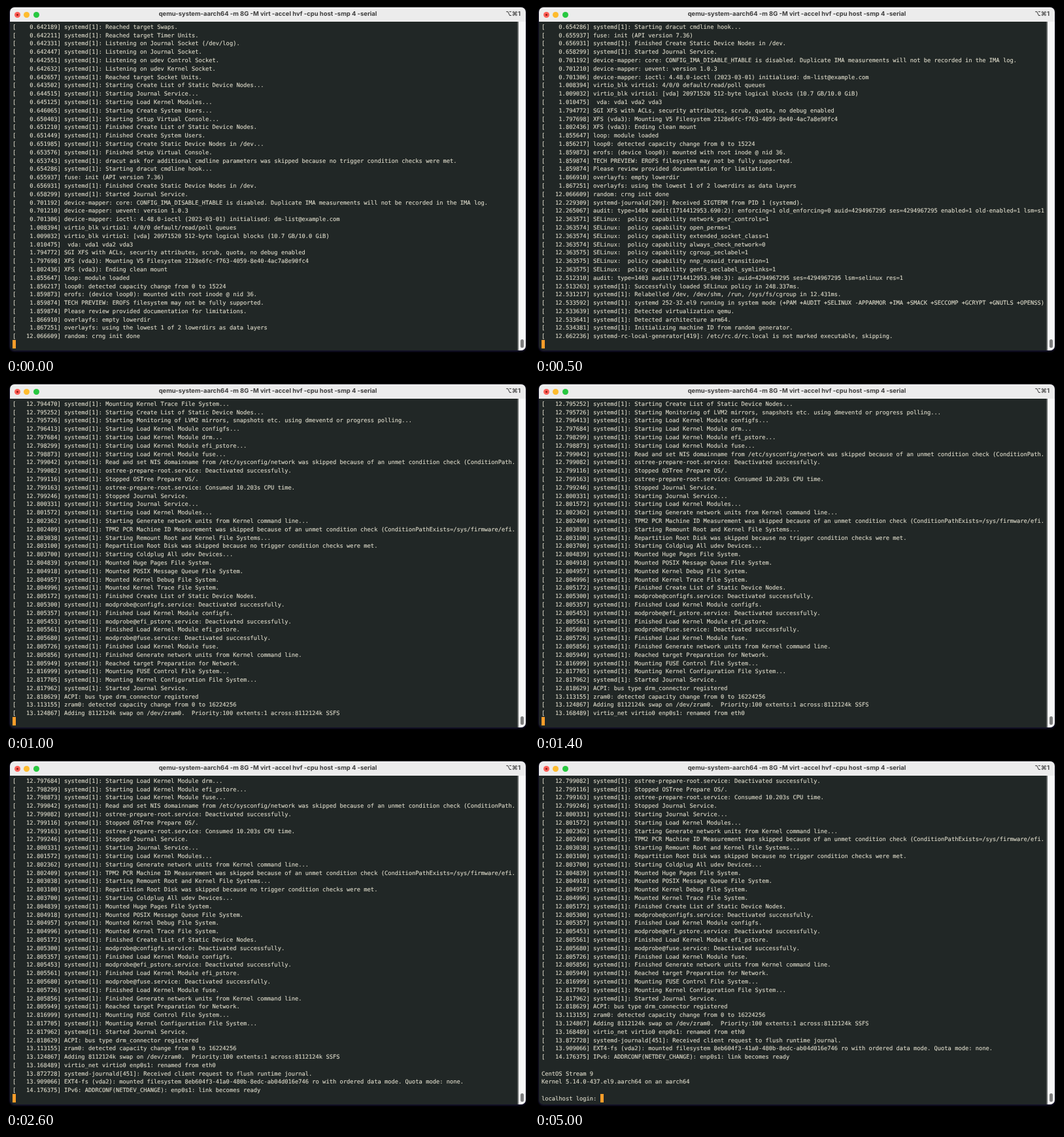
An HTML page that plays this animation: 800x534 px, repeating every 6 s.

```html
<!DOCTYPE html>
<html lang="en">
<head>
<meta charset="utf-8">
<title>Boot console</title>
<style>
  html, body { margin: 0; width: 100%; height: 100%; overflow: hidden; background: #000; }
  body { position: relative; text-rendering: geometricPrecision; }
  #window { position: absolute; left: 6px; top: 2px; width: 789px; height: 525px;
    border-radius: 7px; overflow: hidden; background: #212726; box-shadow: 0 1px 2px 1px #14112a; }
  #window * { position: absolute; margin: 0; white-space: pre; }
  #bar { left: 0; top: 0; width: 100%; height: 21.5px; background: #ececec;
    font: 700 9.45px/21.5px Inter, sans-serif; color: #3c3c3c; }
  #name { left: 0; top: 0; width: 100%; text-align: center; }
  #keys { right: 8px; top: 0; color: #4a4a4a; }
  .light { top: 6.5px; width: 9px; height: 9px; border-radius: 50%; }
  #dot { left: 3px; top: 3px; width: 3px; height: 3px; border-radius: 50%; background: #8c1a10; }
  #track { right: 0; top: 21.5px; width: 11px; bottom: 0; background: #f8f8f8; border-left: 2px solid #5d6160; }
  #thumb { left: 2.5px; bottom: 4px; width: 5.5px; height: 13px; border-radius: 3px; background: #7d7d7d; }
  #log { left: 4px; top: 24.8px; color: #e2dfce; -webkit-text-stroke: .12px #e2dfce;
    font: 8.75px/12.79px "DejaVu Sans Mono", monospace; }
  #cursor { top: 509.3px; width: 5.3px; height: 12.8px; background: #f99d2a; }
</style>
</head>
<body>
<div id="window">
  <div id="bar">
    <i class="light" style="left:6.5px;background:#ff5f57"><i id="dot"></i></i>
    <i class="light" style="left:21px;background:#febc2e"></i>
    <i class="light" style="left:35.5px;background:#28c840"></i>
    <span id="name">qemu-system-aarch64 -m 8G -M virt -accel hvf -cpu host -smp 4 -serial</span>
    <span id="keys">⌥⌘1</span>
  </div>
  <pre id="log"></pre>
  <i id="cursor"></i>
  <div id="track"><i id="thumb"></i></div>
</div>
<script>
const LOOP = 6000, STEP = 100, ROWS = 39, CELL = 5.268;
const BOOT_AT_START = 12.167; // kernel clock, in seconds, when the loop begins
const LOGIN_AT = 3900;
const PROMPT = 'localhost login: ';

const kernelLog = `0.642189 systemd[1]: Reached target Swaps.
0.642211 systemd[1]: Reached target Timer Units.
0.642331 systemd[1]: Listening on Journal Socket (/dev/log).
0.642447 systemd[1]: Listening on Journal Socket.
0.642551 systemd[1]: Listening on udev Control Socket.
0.642632 systemd[1]: Listening on udev Kernel Socket.
0.642657 systemd[1]: Reached target Socket Units.
0.643502 systemd[1]: Starting Create List of Static Device Nodes...
0.644515 systemd[1]: Starting Journal Service...
0.645125 systemd[1]: Starting Load Kernel Modules...
0.646065 systemd[1]: Starting Create System Users...
0.650403 systemd[1]: Starting Setup Virtual Console...
0.651210 systemd[1]: Finished Create List of Static Device Nodes.
0.651449 systemd[1]: Finished Create System Users.
0.651985 systemd[1]: Starting Create Static Device Nodes in /dev...
0.653576 systemd[1]: Finished Setup Virtual Console.
0.653743 systemd[1]: dracut ask for additional cmdline parameters was skipped because no trigger condition checks were met.
0.654286 systemd[1]: Starting dracut cmdline hook...
0.655937 fuse: init (API version 7.36)
0.656931 systemd[1]: Finished Create Static Device Nodes in /dev.
0.658299 systemd[1]: Started Journal Service.
0.701192 device-mapper: core: CONFIG_IMA_DISABLE_HTABLE is disabled. Duplicate IMA measurements will not be recorded in the IMA log.
0.701210 device-mapper: uevent: version 1.0.3
0.701306 device-mapper: ioctl: 4.48.0-ioctl (2023-03-01) initialised: dm-list@example.com
1.008394 virtio_blk virtio1: 4/0/0 default/read/poll queues
1.009032 virtio_blk virtio1: [vda] 20971520 512-byte logical blocks (10.7 GB/10.0 GiB)
1.010475  vda: vda1 vda2 vda3
1.794772 SGI XFS with ACLs, security attributes, scrub, quota, no debug enabled
1.797698 XFS (vda3): Mounting V5 Filesystem 2128e6fc-f763-4059-8e40-4ac7a8e90fc4
1.802436 XFS (vda3): Ending clean mount
1.855647 loop: module loaded
1.856217 loop0: detected capacity change from 0 to 15224
1.859873 erofs: (device loop0): mounted with root inode @ nid 36.
1.859874 TECH PREVIEW: EROFS filesystem may not be fully supported.
1.859874 Please review provided documentation for limitations.
1.866910 overlayfs: empty lowerdir
1.867251 overlayfs: using the lowest 1 of 2 lowerdirs as data layers
12.066609 random: crng init done
12.229309 systemd-journald[209]: Received SIGTERM from PID 1 (systemd).
12.265067 audit: type=1404 audit(1714412953.690:2): enforcing=1 old_enforcing=0 auid=4294967295 ses=4294967295 enabled=1 old-enabled=1 lsm=s1
12.363571 SELinux:  policy capability network_peer_controls=1
12.363574 SELinux:  policy capability open_perms=1
12.363574 SELinux:  policy capability extended_socket_class=1
12.363574 SELinux:  policy capability always_check_network=0
12.363575 SELinux:  policy capability cgroup_seclabel=1
12.363575 SELinux:  policy capability nnp_nosuid_transition=1
12.363575 SELinux:  policy capability genfs_seclabel_symlinks=1
12.512310 audit: type=1403 audit(1714412953.940:3): auid=4294967295 ses=4294967295 lsm=selinux res=1
12.513263 systemd[1]: Successfully loaded SELinux policy in 248.337ms.
12.531217 systemd[1]: Relabelled /dev, /dev/shm, /run, /sys/fs/cgroup in 12.431ms.
12.533592 systemd[1]: systemd 252-32.el9 running in system mode (+PAM +AUDIT +SELINUX -APPARMOR +IMA +SMACK +SECCOMP +GCRYPT +GNUTLS +OPENSS)
12.533639 systemd[1]: Detected virtualization qemu.
12.533641 systemd[1]: Detected architecture arm64.
12.534381 systemd[1]: Initializing machine ID from random generator.
12.662236 systemd-rc-local-generator[419]: /etc/rc.d/rc.local is not marked executable, skipping.
12.793127 systemd[1]: Mounting POSIX Message Queue File System...
12.793814 systemd[1]: Mounting Kernel Debug File System...
12.794470 systemd[1]: Mounting Kernel Trace File System...
12.795252 systemd[1]: Starting Create List of Static Device Nodes...
12.795726 systemd[1]: Starting Monitoring of LVM2 mirrors, snapshots etc. using dmeventd or progress polling...
12.796413 systemd[1]: Starting Load Kernel Module configfs...
12.797684 systemd[1]: Starting Load Kernel Module drm...
12.798299 systemd[1]: Starting Load Kernel Module efi_pstore...
12.798873 systemd[1]: Starting Load Kernel Module fuse...
12.799042 systemd[1]: Read and set NIS domainname from /etc/sysconfig/network was skipped because of an unmet condition check (ConditionPath.
12.799082 systemd[1]: ostree-prepare-root.service: Deactivated successfully.
12.799116 systemd[1]: Stopped OSTree Prepare OS/.
12.799163 systemd[1]: ostree-prepare-root.service: Consumed 10.203s CPU time.
12.799246 systemd[1]: Stopped Journal Service.
12.800331 systemd[1]: Starting Journal Service...
12.801572 systemd[1]: Starting Load Kernel Modules...
12.802362 systemd[1]: Starting Generate network units from Kernel command line...
12.802409 systemd[1]: TPM2 PCR Machine ID Measurement was skipped because of an unmet condition check (ConditionPathExists=/sys/firmware/efi.
12.803038 systemd[1]: Starting Remount Root and Kernel File Systems...
12.803100 systemd[1]: Repartition Root Disk was skipped because no trigger condition checks were met.
12.803700 systemd[1]: Starting Coldplug All udev Devices...
12.804839 systemd[1]: Mounted Huge Pages File System.
12.804918 systemd[1]: Mounted POSIX Message Queue File System.
12.804957 systemd[1]: Mounted Kernel Debug File System.
12.804996 systemd[1]: Mounted Kernel Trace File System.
12.805172 systemd[1]: Finished Create List of Static Device Nodes.
12.805300 systemd[1]: modprobe@configfs.service: Deactivated successfully.
12.805357 systemd[1]: Finished Load Kernel Module configfs.
12.805453 systemd[1]: modprobe@efi_pstore.service: Deactivated successfully.
12.805561 systemd[1]: Finished Load Kernel Module efi_pstore.
12.805680 systemd[1]: modprobe@fuse.service: Deactivated successfully.
12.805726 systemd[1]: Finished Load Kernel Module fuse.
12.805856 systemd[1]: Finished Generate network units from Kernel command line.
12.805949 systemd[1]: Reached target Preparation for Network.
12.816999 systemd[1]: Mounting FUSE Control File System...
12.817705 systemd[1]: Mounting Kernel Configuration File System...
12.817962 systemd[1]: Started Journal Service.
12.818629 ACPI: bus type drm_connector registered
13.113155 zram0: detected capacity change from 0 to 16224256
13.124867 Adding 8112124k swap on /dev/zram0.  Priority:100 extents:1 across:8112124k SSFS
13.168489 virtio_net virtio0 enp0s1: renamed from eth0
13.872728 systemd-journald[451]: Received client request to flush runtime journal.
13.909066 EXT4-fs (vda2): mounted filesystem 8eb604f3-41a0-480b-8edc-ab04d016e746 ro with ordered data mode. Quota mode: none.
14.176375 IPv6: ADDRCONF(NETDEV_CHANGE): enp0s1: link becomes ready`
  .split('\n').map(line => {
    const stamp = line.split(' ', 1)[0];
    return { at: +stamp, text: `[${stamp.padStart(12)}]${line.slice(stamp.length)}` };
  });

const loginLines = ['', 'CentOS Stream 9', 'Kernel 5.14.0-437.el9.aarch64 on an aarch64', '', PROMPT];

const log = document.getElementById('log');
const cursor = document.getElementById('cursor');
let shown = -1;

function draw(time) {
  const clock = BOOT_AT_START + time / 1000;
  const atLogin = time >= LOGIN_AT;
  const lines = kernelLog.filter(entry => entry.at <= clock).map(entry => entry.text);
  lines.push(...(atLogin ? loginLines : ['']));
  log.textContent = lines.slice(-ROWS).join('\n');
  cursor.style.left = 4 + (atLogin ? PROMPT.length * CELL : 0) + 'px';
}

function tick() {
  const time = Math.floor(performance.now() % LOOP / STEP) * STEP;
  if (time !== shown) draw(shown = time);
  requestAnimationFrame(tick);
}
tick();
</script>
</body>
</html>
```
